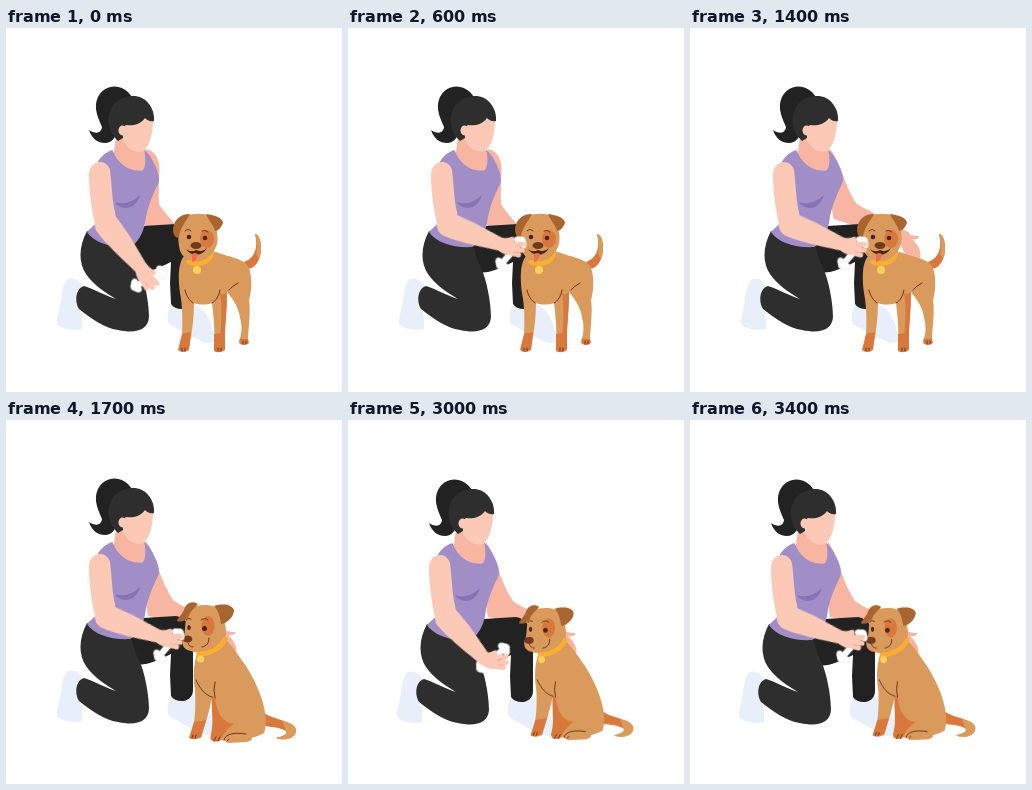
An HTML page that plays this animation: 336 px wide and 364 px high, repeating every 4.4 s.

```html
<!DOCTYPE html>
<html lang="th">
<head>
<meta charset="utf-8">
<title>Dog training</title>
<style>
html, body { margin: 0; width: 100%; height: 100%; overflow: hidden; background: #fff; }
svg { display: block; width: 100vw; height: 100vh; }

/* One loop is 44 ticks of 100 ms; steps(n) spends n ticks on a move. */
.anim { animation: 4400ms -8ms infinite step-end; }
.woman { animation-name: woman; }
.stand { animation-name: stand; }
.sit { animation-name: sit; }
.forearm { animation-name: forearm; }
.hand { animation-name: hand; }
.bone { animation-name: bone; }
.far-arm { animation-name: far-arm; }
.far-hand { animation-name: far-hand; }
.dot1 { animation-name: dot1; }
.dot2 { animation-name: dot2; }
.bubble { animation-name: bubble; }

@keyframes woman {
  0% { transform: none; }
  68.182%, 100% { transform: translate(-2px, 1px); }
}
@keyframes stand {
  0% { opacity: 1; }
  38.636%, 100% { opacity: 0; }
}
@keyframes sit {
  0% { opacity: 0; transform: none; }
  38.636% { opacity: 1; transform: none; }
  68.182%, 100% { opacity: 1; transform: translate(6.8px, 10.1px) scale(.96); }
}
@keyframes forearm {
  0% { transform: translate(101px, 197px) rotate(51deg); animation-timing-function: steps(3); }
  6.818% { transform: translate(101px, 197px) rotate(39deg); animation-timing-function: steps(3); }
  13.636% { transform: translate(101px, 197px) rotate(20deg); }
  38.636% { transform: translate(101px, 197px) rotate(20deg); animation-timing-function: steps(3); }
  45.455% { transform: translate(101px, 197px) rotate(31deg); }
  68.182% { transform: translate(101px, 197px) rotate(47deg); animation-timing-function: steps(4); }
  77.273%, 100% { transform: translate(101px, 197px) rotate(20deg); }
}
@keyframes hand {
  0% { transform: translate(56px, 0) rotate(0deg); animation-timing-function: steps(3); }
  6.818% { transform: translate(56px, 0) rotate(-14deg); }
  38.636% { transform: translate(56px, 0) rotate(-14deg); animation-timing-function: steps(3); }
  45.455% { transform: translate(56px, 0) rotate(-20deg); }
  68.182% { transform: translate(56px, 0) rotate(-48deg); animation-timing-function: steps(4); }
  77.273%, 100% { transform: translate(56px, 0) rotate(-14deg); }
}
@keyframes bone {
  0% { transform: translate(143px, 251px) rotate(-28deg); animation-timing-function: steps(3); }
  6.818% { transform: translate(152px, 246px) rotate(-36deg); animation-timing-function: steps(3); }
  13.636% { transform: translate(163px, 225px) rotate(-49deg); }
  38.636% { transform: translate(163px, 225px) rotate(-49deg); animation-timing-function: steps(3); }
  45.455% { transform: translate(154px, 238px) rotate(-49deg); }
  68.182% { transform: translate(147px, 237px) rotate(-39deg); animation-timing-function: steps(4); }
  77.273%, 100% { transform: translate(164px, 225px) rotate(-49deg); }
}
@keyframes far-arm {
  0% { d: path("M140 121C152 124 155 135 153 152C153 165 152 174 154 178C158 184 164 190 170 198C172 205 165 208 160 205C150 203 140 200 138 195C137 170 140 140 140 121Z"); }
  15.909% { d: path("M140 121C152 124 155 135 153 152C153 165 152 174 154 178C158 184 164 190 170 198C172 205 165 208 160 205C150 203 140 200 138 195C137 170 140 140 140 121Z"); animation-timing-function: steps(4); }
  25% { d: path("M140 121C147 125 152 138 157 148C160 155 162 160 165 163C178 168 200 179 222 194C224 202 216 205 210 203C195 197 165 188 149 176C144 165 140 140 140 121Z"); animation-timing-function: steps(4); }
  34.091%, 100% { d: path("M140 121C144 127 149 138 153 150C157 163 162 172 167 180C175 186 190 192 218 208C220 214 214 216 208 215C190 206 160 200 142 196C139 180 140 140 140 121Z"); }
}
@keyframes far-hand {
  0% { transform: translate(-52px, 10px); }
  15.909% { transform: translate(-52px, 10px); animation-timing-function: steps(4); }
  25% { transform: translate(0, 0); animation-timing-function: steps(4); }
  34.091%, 100% { transform: translate(0, 16px); }
}
@keyframes dot1 {
  0% { opacity: 0; }
  40.909% { opacity: 1; }
  68.182%, 100% { opacity: 0; }
}
@keyframes dot2 {
  0% { opacity: 0; }
  43.182% { opacity: 1; }
  68.182%, 100% { opacity: 0; }
}
@keyframes bubble {
  0% { opacity: 0; }
  45.455% { opacity: 1; }
  68.182%, 100% { opacity: 0; }
}

.skin { fill: #fbc9b5; }
.shade { fill: #f8b5a1; }
.sock { fill: #e8effb; }
.hair-back, .far-leg { fill: #222; }
.hair, .near-leg { fill: #2e2e2e; }
.top { fill: #a28ec7; }
.fold { fill: #8972b5; }
.fur { fill: #d99a5c; }
.ear { fill: #a9652f; }
.rust { fill: #d9783c; }
.nose { fill: #713a1d; }
.dark { fill: #4a2715; }
.gold { fill: #fbd05a; }
.tongue { fill: #f26b4b; }
.collar { fill: none; stroke: #f9ae33; stroke-width: 5; stroke-linecap: round; }
.line { fill: none; stroke: #6b371b; stroke-width: 1; stroke-linecap: round; }
.finger { fill: none; stroke: #fbc9b5; stroke-width: 5; stroke-linecap: round; }
.crease { fill: none; stroke: #f2a48f; stroke-width: .7; }
.bone { fill: #fff; stroke: #d9d9d9; stroke-width: .5; }
.navy { fill: #2e3192; }
.word { fill: none; stroke: #fff; stroke-width: 4; stroke-linecap: round; stroke-linejoin: round; }
.mark { stroke-width: 5.5; }
</style>
</head>
<body>
<svg viewBox="0 0 336 364" preserveAspectRatio="none">
  <g class="anim woman">
    <path class="sock" d="M62 251C67 249 73 252 77 259C71 262 70 270 73 281C77 287 76 294 76 301C69 303 57 302 51 296C50 290 53 285 54 277C56 268 56 255 62 251Z"/>
    <path class="sock" d="M165 277C161 283 161 292 163 296C175 303 185 309 200 315L208 314C208 300 203 288 195 280L188 276Z"/>
    <path class="anim far-arm shade" d="M140 121C152 124 155 135 153 152C153 165 152 174 154 178C158 184 164 190 170 198C172 205 165 208 160 205C150 203 140 200 138 195C137 170 140 140 140 121Z"/>
    <path class="anim far-hand shade" d="M208 190C216 194 224 196 229 196C230 198 226 200 222 199C228 204 232 212 230 218C226 223 219 220 215 214L208 200Z"/>
    <path class="far-leg" d="M137 198L170 196C181 198 187 208 187 225L187 270C187 283 170 284 165 276L164 255L165 234C150 241 140 246 130 244L122 215Z"/>
    <path class="near-leg" d="M81 203C73 218 72 234 80 246C87 256 98 264 110 271C98 267 88 261 78 258C70 260 68 273 73 281C86 291 98 300 112 302C130 306 142 302 143 289C143 273 138 247 130 234L124 214Z"/>
    <path class="shade" d="M110 108L108 124C105 138 122 146 138 142L142 130L138 121L134 117Z"/>
    <path class="top" d="M106 122C98 125 93 130 90 138L104 150L105 180C98 190 86 198 81 204C88 215 106 220 124 219C132 215 137 205 139 195C141 180 146 168 152 156C155 150 151 140 144 128L138 121C140 130 140 138 137 142C124 145 111 135 107 123Z"/>
    <path class="fold" d="M109 174C116 177 126 175 134 167C131 178 122 182 115 179C112 178 110 176 109 174Z"/>
    <path class="hair-back" d="M126 69C118 56 100 54 92 69C87 80 92 90 96 99C95 106 89 106 83 102C86 111 92 115 99 115C107 115 112 107 110 98Z"/>
    <path class="skin" d="M116 97L139 88L147 92C147 104 144 118 137 123C128 126 120 119 116 111Z"/>
    <path class="hair" d="M112 113C103 105 100 92 105 81C110 70 125 65 136 70C144 74 149 84 148 93C144 94 141 92 139 90C134 97 126 98 120 97C116 99 117 105 117 110Z"/>
    <ellipse class="skin" cx="116.500" cy="102.500" rx="4" ry="5"/>
    <path class="skin" d="M83 146C84 132 100 130 104 142C106 158 106 172 109 184L111 198L91 204C86 185 83 165 83 146Z"/>
  </g>

  <g class="anim stand">
    <path class="rust" d="M238 234C247 231 253 222 249 206C255 206 257 223 253 231C250 239 244 242 240 240Z"/>
    <path class="fur" d="M249 206C255 206 257 223 253 231L250 226C252 220 251 213 249 206Z"/>
    <path class="fur" d="M178 228C172 235 172 250 174 265C177 280 177 300 175 320L183 320C186 305 188 290 188 275C193 277 200 277 206 275C208 290 209 305 208 320L218 320C219 300 221 280 221 264C224 268 233 278 234 290C237 300 235 308 233 313L242 313C242 300 245 285 243 272C246 262 246 248 243 240C238 230 225 230 210 224Z"/>
    <path class="rust" d="M214 265C217 268 219 265 221 264C221 280 219 300 218 320L213 320C215 300 217 280 214 265Z"/>
    <path class="rust" d="M176 306L185 304L183 322Q177 326 172 322ZM208 306L219 305L219 322Q213 326 208 323ZM234 311L242 311L243 315Q238 319 233 315Z"/>
    <path class="line" d="M179 262C180 268 184 273 187 275M214 262C213 268 210 273 206 275M232 255Q226 258 223 262M176 320v3M179 320v3M212 320v3M215 320v3M237 313v3M240 313v3"/>
    <path class="collar" d="M183 234C192 238 203 235 206 225"/>
    <circle class="gold" cx="191" cy="242" r="4"/>
    <path class="fur" d="M180 188C187 185 198 185 204 188C210 196 213 208 211 216C208 226 201 233 191 233C181 233 174 228 173 218C171 206 174 196 180 188Z"/>
    <ellipse class="rust" cx="201" cy="211" rx="7" ry="9"/>
    <path class="ear" d="M184 186C174 186 167 192 167 203C168 209 171 211 173 209C174 200 179 195 184 186ZM200 186C209 187 217 190 217 195C215 200 212 203 209 203C207 196 203 193 200 186Z"/>
    <path class="line" d="M179 203q3-3 6 0M196 203q3-2 6 1"/>
    <circle class="dark" cx="183" cy="209" r="2.300"/>
    <circle class="dark" cx="199" cy="210" r="2.300"/>
    <path class="dark" d="M180 221Q185 225 190 222Q196 225 201 220Q198 226 190 227Q183 226 180 221Z"/>
    <path class="tongue" d="M186 226Q189 224 192 226C191 231 189 234 186 234Z"/>
    <ellipse class="nose" cx="190" cy="217.500" rx="5.500" ry="3.500"/>
  </g>

  <g class="anim sit">
    <path class="rust" d="M256 291C265 300 284 299 290 309C291 319 278 321 270 318C276 316 282 315 280 311C272 306 264 308 257 305Z"/>
    <path class="fur" d="M276 301C283 302 288 304 290 309C291 319 278 321 270 318C276 316 282 315 280 311Z"/>
    <path class="fur" d="M192 230C187 245 187 258 189 270C190 290 189 305 184 316L195 318C199 305 203 292 206 278C210 290 210 305 206 318L216 320C230 322 250 318 258 313C263 300 258 275 240 246C232 235 226 225 219 219Z"/>
    <path class="rust" d="M206 276C205 290 208 303 205 314C203 320 206 323 214 321C217 314 222 308 228 304C218 303 211 295 209 278ZM188 302L200 300L195 317Q189 321 183 318Z"/>
    <path class="fur" d="M218 320C219 314 228 312 240 314C248 316 248 321 240 322L222 323Z"/>
    <path class="line" d="M190 260C194 269 199 275 206 277M209 262Q207 270 209 278M218 320C219 314 228 312 240 314M187 315l-1 3M190 315l-1 3M210 317l-2 4M214 317l-2 4M223 319l-2 2"/>
    <path class="fur" d="M190 186C200 184 208 185 212 189C220 200 222 212 218 222C210 231 195 235 185 231C176 230 175 222 178 216C180 208 178 200 183 194Z"/>
    <path class="collar" d="M193 234C204 234 215 228 219 219"/>
    <circle class="gold" cx="194.500" cy="239" r="3.600"/>
    <ellipse class="rust" cx="202" cy="206" rx="6.500" ry="10"/>
    <path class="ear" d="M192 184C186 180 180 183 178 190C175 196 171 199 171 201C178 203 182 199 184 193ZM208 186C218 183 226 185 228 190C228 197 221 203 215 204C214 196 212 190 208 186Z"/>
    <path class="line" d="M180 200q2-3 5-1M195 200q4-3 7 0M182 223Q183 227 187 227M196 227C201 226 203 223 203 218"/>
    <ellipse class="dark" cx="183" cy="207.500" rx="1.700" ry="2.500"/>
    <circle class="dark" cx="198.500" cy="208.500" r="2.500"/>
    <ellipse class="nose" cx="181.500" cy="219" rx="4.800" ry="3.600"/>
  </g>

  <g class="anim woman">
    <path class="anim bone" d="M-11-3H11C10-8 16-9 18-4C21-2 21 2 18 4C16 9 10 8 11 3H-11C-10 8-16 9-18 4C-21 2-21-2-18-4C-16-9-10-8-11-3Z"/>
    <g class="anim forearm">
      <path class="skin" d="M0-12C20-12 40-8 56-6A6.500 6.500 0 0 1 56 7C40 9 15 13 0 12A12 12 0 0 1 0-12Z"/>
      <g class="anim hand">
        <path class="skin" d="M-2-6C4-7 9-7 12-4L13 8C9 12 3 10-2 7Z"/>
        <path class="finger" d="M3-3L10-6M9-1L21-2M9 4L21 4M7 7L18 9"/>
        <path class="crease" d="M13 1L21 1M12 6.500L19 6.500"/>
      </g>
    </g>
  </g>

  <circle class="anim dot1 navy" cx="168.800" cy="109.300" r="5"/>
  <circle class="anim dot2 navy" cx="188" cy="93.500" r="7.400"/>
  <g class="anim bubble" role="img" aria-label="นั่ง">
    <ellipse class="navy" cx="249" cy="69.500" rx="52.300" ry="32.500" transform="rotate(3 249 69.500)"/>
    <path class="word" d="M235 72a2.500 2.500 0 1 1 3-2V81C241 81 244 79 247 77M248 68V79a2.500 2.500 0 1 0-2-3Q250 79 252 80M257 72a2.500 2.500 0 1 1 4-2Q265 72 264 79Q261 84 257 79L255 76M240 59a2 2 0 1 1 3 2Q250 62 251 56"/>
    <path class="word mark" d="M249 45.500V49.500"/>
  </g>
</svg>
</body>
</html>
```
